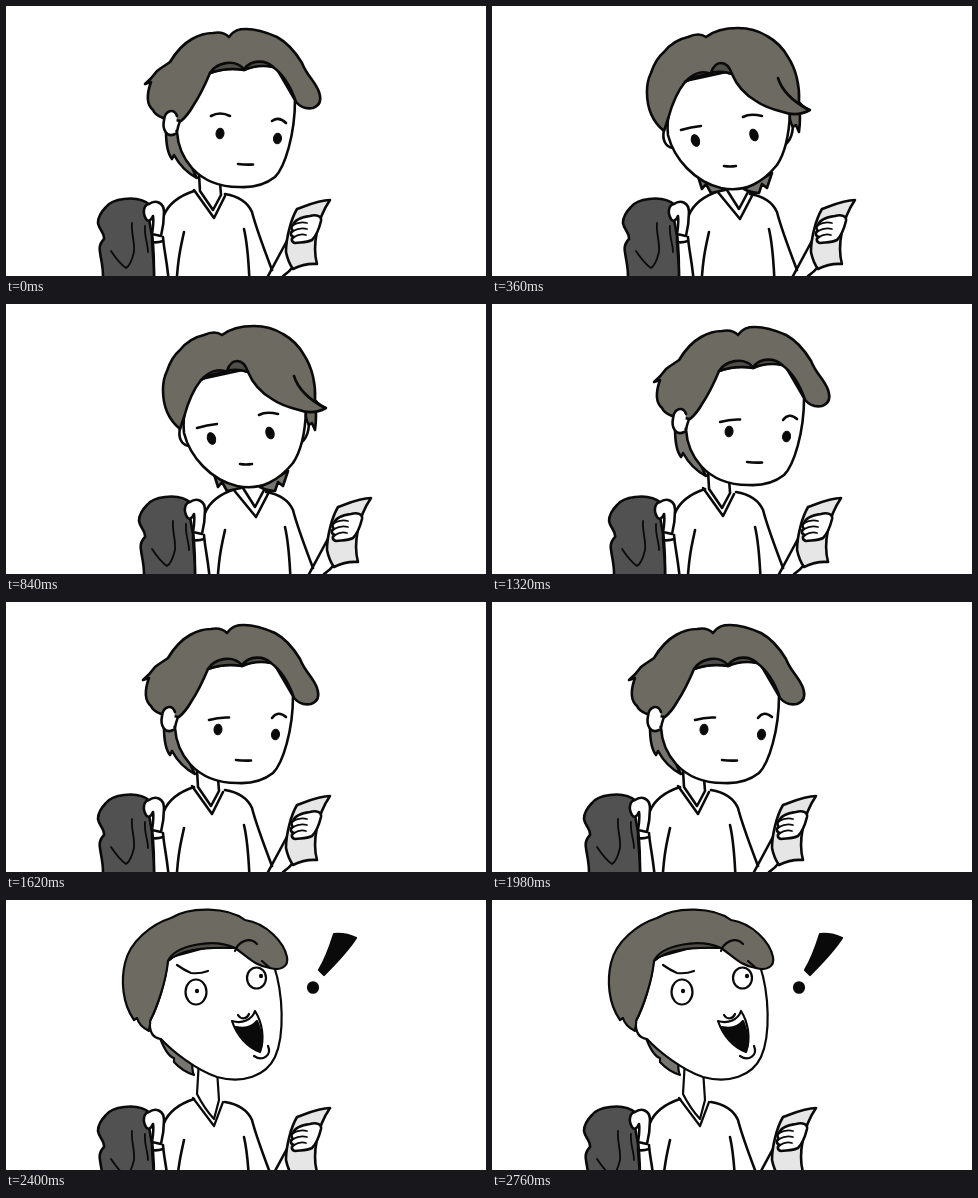
These frames come from a looping animation (480 px wide and 270 px high, 2.82 s). An HTML page:

```html
<!DOCTYPE html>
<html lang="en">
<head>
<meta charset="utf-8">
<title>Receipt</title>
<style>
html, body { margin: 0; width: 100%; height: 100%; overflow: hidden; background: #fff; }
svg { display: block; width: 100vw; height: 100vh; }
path, ellipse { stroke: #0a0a0a; stroke-width: 2.6; stroke-linecap: round; stroke-linejoin: round; fill: none; }
#shock path, #shock ellipse { stroke-width: 2.2; }
.skin { fill: #fff; }
.hair { fill: #6d6a61; }
.under { fill: #504e49; }
.nape { fill: #77756f; }
.bag { fill: #515151; }
.paper { fill: #e6e6e6; }
.ink { fill: #0a0a0a; stroke-width: 1; }
.thin { stroke-width: 1.8; }
</style>
</head>
<body>
<svg viewBox="0 0 480 270">
  <g id="body">
    <!-- torso -->
    <path d="M188 185C173 190 163 197 158 209M178 226C175 240 171 254 170 290M219 188C231 190 241 195 246 206C250 222 258 243 266 264M238 223C241 236 243 252 244 290"/>
    <path d="M157 231C158 246 162 257 164 290M146 228C148 244 148 254 148 290"/>
    <!-- bag -->
    <path class="bag" d="M144 199C136 192 126 192 118 193C109 194 103 197 100 201C95 206 92 211 92 217C93 224 99 227 98 233C94 237 93 241 94 246C95 254 97 260 97 270V300H148V270C148 254 146 242 146 230L143 213Z"/>
    <path class="thin" d="M126 217C125 228 129 235 128 246C126 254 124 260 120 262C114 258 109 251 105 245M139 220C138 230 142 238 142 246"/>
    <path class="skin" d="M140 213C136 206 138 199 143 198C150 193 158 197 158 206C158 215 157 222 155 230L146 228C147 221 148 216 147 210C145 215 142 216 140 213Z"/>
    <path d="M146 236Q151 237 157 235"/>
    <!-- slip and right hand -->
    <path class="skin" d="M283 231L262 270M286 262C283 266 280 268 277 270"/>
    <path class="paper" d="M324 194C313 194 302 199 291 203C285 213 280 232 280 246Q282 256 287 263Q299 257 311 258C306 240 311 213 324 194Z"/>
    <path class="skin" d="M287 219C289 213 296 211 304 210C310 208 316 210 315 215C313 223 311 229 306 234C300 237 294 236 289 237C285 236 285 232 288 231C284 230 284 226 287 225C285 223 285 220 287 219Z"/>
    <path class="thin" d="M287 219Q294 215 301 217M287 225Q294 221 301 223M288 231Q294 227 300 229"/>
  </g>

  <g id="side">
    <path class="skin" d="M193 168L194 185L207 204L215 189L214 176"/>
    <path d="M188 184L208 212L219 190"/>
    <path class="nape" d="M160 125C160 139 162 148 166 153L168 149C174 160 181 167 191 172C186 163 183 156 184 150L171 125Z"/>
    <path class="skin" d="M203 62C190 85 173 110 171 126C172 142 178 153 186 162C196 173 212 181 233 181C248 182 260 178 269 171C279 161 289 128 289 94L268 58Z"/>
    <path class="hair" d="M151 65C156 61 160 59 164 56C170 46 177 38 186 33C193 29 200 27 207 27Q217 25 223 31C228 24 233 23 240 23C252 23 262 27 271 31C282 37 290 47 296 57C301 70 309 75 313 86C316 95 313 100 307 102Q297 104 290 96C285 81 278 69 267 61Q252 57 238 64Q221 61 204 67C199 79 193 91 187 100Q182 109 175 115L157 112Q149 109 147 104C140 98 141 87 145 76L139 78Q146 72 151 65Z"/>
    <path class="under" d="M204 67C210 57 228 52 238 63C246 53 260 54 267 61Q252 58 238 64Q221 61 204 67Z"/>
    <path class="skin" d="M171 110C168 102 159 104 158 114C156 124 161 132 169 128"/>
    <ellipse class="ink" cx="214" cy="127.5" rx="4" ry="5.2" transform="rotate(8 214 127.5)"/>
    <ellipse class="ink" cx="271.5" cy="132.5" rx="4" ry="5.2" transform="rotate(8 271.5 132.5)"/>
    <path d="M232 158Q240 159 247 158.5"/>
    <path id="calm" d="M205 110Q214 105 224 110M266 115Q273 110 280 117"/>
    <path id="stern" d="M205 118Q215 115 225 115.500M268 116Q274 108 282 115"/>
  </g>

  <g id="front">
    <path class="skin" d="M196 176V184L208 203L217 186V176"/>
    <path d="M186 185L209 213L222 188"/>
    <path class="nape" d="M166 167L171 183L175 178L180 187L194 184ZM241 167L236 182L231 178L228 187Q220 187 213 183Z"/>
    <path class="skin" d="M133 124C131 133 134 141 142 142M259 112C264 119 262 132 254 139"/>
    <path class="skin" d="M154 75C140 92 135 110 137 129C143 153 164 176 190 182C215 187 232 176 246 159C254 147 258 132 259 107L200 65Z"/>
    <path class="hair" d="M259 107Q258 115 262 121L265 119L268 126Q270 112 268 97Z"/>
    <path class="hair" d="M133 125C122 116 116 102 116 86C116 79 117 73 120 67C123 58 127 51 133 46C140 37 148 33 157 31Q168 26 175 31C184 24 196 22 207 22C218 22 228 25 236 30C245 35 252 42 257 51C265 63 269 80 268 96Q272 101 279 104C268 110 260 109 252 106C240 103 232 100 225 95C213 88 206 80 201 68Q190 64 180 67Q164 69 154 76C146 86 141 98 137 113Z"/>
    <path d="M247 72C251 85 261 95 278 104"/>
    <path class="under" d="M154 76C162 67 172 64 180 68Q165 69 154 76ZM180 67C184 54 196 53 201 68Q190 64 180 67Z"/>
    <ellipse class="ink" cx="164.5" cy="134.5" rx="4" ry="6" transform="rotate(-18 164.5 134.5)"/>
    <ellipse class="ink" cx="223" cy="129" rx="4" ry="6" transform="rotate(-18 223 129)"/>
    <path d="M150 124Q160 121 170 120M212 111Q219 107 231 110M193 160Q199 161 205 160"/>
  </g>

  <g id="shock">
    <path class="skin" d="M193 160L191 194Q198 208 208 219L213 200L211 170"/>
    <path d="M187 198L208 226L217 202"/>
    <path class="nape" d="M154 138C159 151 164 157 168 158L168 162Q176 171 188 175C185 169 187 163 186 158L158 134Z"/>
    <path class="skin" d="M162 58C160 82 151 108 144 121C143 133 147 138 155 139C166 151 190 170 211 177C237 184 260 176 269 157C279 135 277 93 268 66L228 40Z"/>
    <path class="hair" d="M144 121C145 124 143 127 143 131Q133 126 131 118L128 120C116 103 115 80 119 63C124 41 146 24 165 18C184 6 222 7 239 20C260 23 278 42 281 57C283 67 274 71 264 68C249 66 242 57 229 48Q203 47 187 50Q172 52 162 61C160 82 151 107 144 121Z"/>
    <path class="under" d="M162 61C169 45 207 38 229 48Q203 47 187 50Q171 53 162 61Z"/>
    <path d="M229 51C232 42 243 36 251 44M171 65Q178 70 185 73Q194 74 202 71M256 61L264 68"/>
    <ellipse class="skin" cx="190" cy="92" rx="10.5" ry="12.5"/>
    <ellipse class="skin" cx="250.5" cy="78" rx="9.5" ry="10.5"/>
    <ellipse class="ink" cx="191" cy="91" rx="1" ry="1.2"/>
    <ellipse class="ink" cx="255" cy="76" rx="1" ry="1.2"/>
    <path d="M232 115C235 120 241 119 243 114"/>
    <path class="skin" d="M226 121C236 124 246 120 249 111C256 122 259 138 254 152C242 148 231 136 226 121Z"/>
    <path class="ink" d="M230 127Q244 130 251 121C256 134 257 144 254 151C244 147 235 137 230 127Z"/>
    <path d="M262 146C266 155 257 162 248 156"/>
    <path class="ink" d="M328 34Q340 33 350 38C341 52 330 63 318 75L313 70C319 60 324 47 328 34Z"/>
    <ellipse class="ink" cx="307" cy="87.5" rx="5" ry="5.2"/>
  </g>
</svg>
<script>
const LOOP = 2820, STEP = 60, REACH = 41, POP = 2040;
const el = id => document.getElementById(id);
const ease = (t, start, span) => {
  const p = Math.min(1, Math.max(0, (t - start) / span));
  return (1 - Math.cos(Math.PI * p)) / 2;
};
const show = (id, on) => el(id).style.display = on ? "" : "none";
const move = (id, x, y = 0) => el(id).setAttribute("transform", `translate(${x} ${y})`);

// time each pose begins
const poses = [[0, "side"], [120, "front"], [1200, "side"], [POP, "shock"]];

function draw(ms) {
  const t = Math.floor(ms % LOOP / STEP) * STEP;
  const pose = poses.filter(p => p[0] <= t).pop()[1];
  const x = REACH * (ease(t, 0, 420) - ease(t, 1140, 420));
  const late = t >= 1200;
  const shock = t >= POP;
  const hop = shock ? -8 * (1 - ease(t, POP, 180)) : 0;

  for (const id of ["side", "front", "shock"]) show(id, id === pose);
  show("calm", !late);
  show("stern", late);
  move("body", x, shock ? 14 + hop : 0);
  move("side", late ? x - 2 : x);
  move("front", x);
  move("shock", 0, hop);
}

const begin = performance.now();
function tick() {
  draw(performance.now() - begin);
  requestAnimationFrame(tick);
}
draw(0);
requestAnimationFrame(tick);
</script>
</body>
</html>
```
